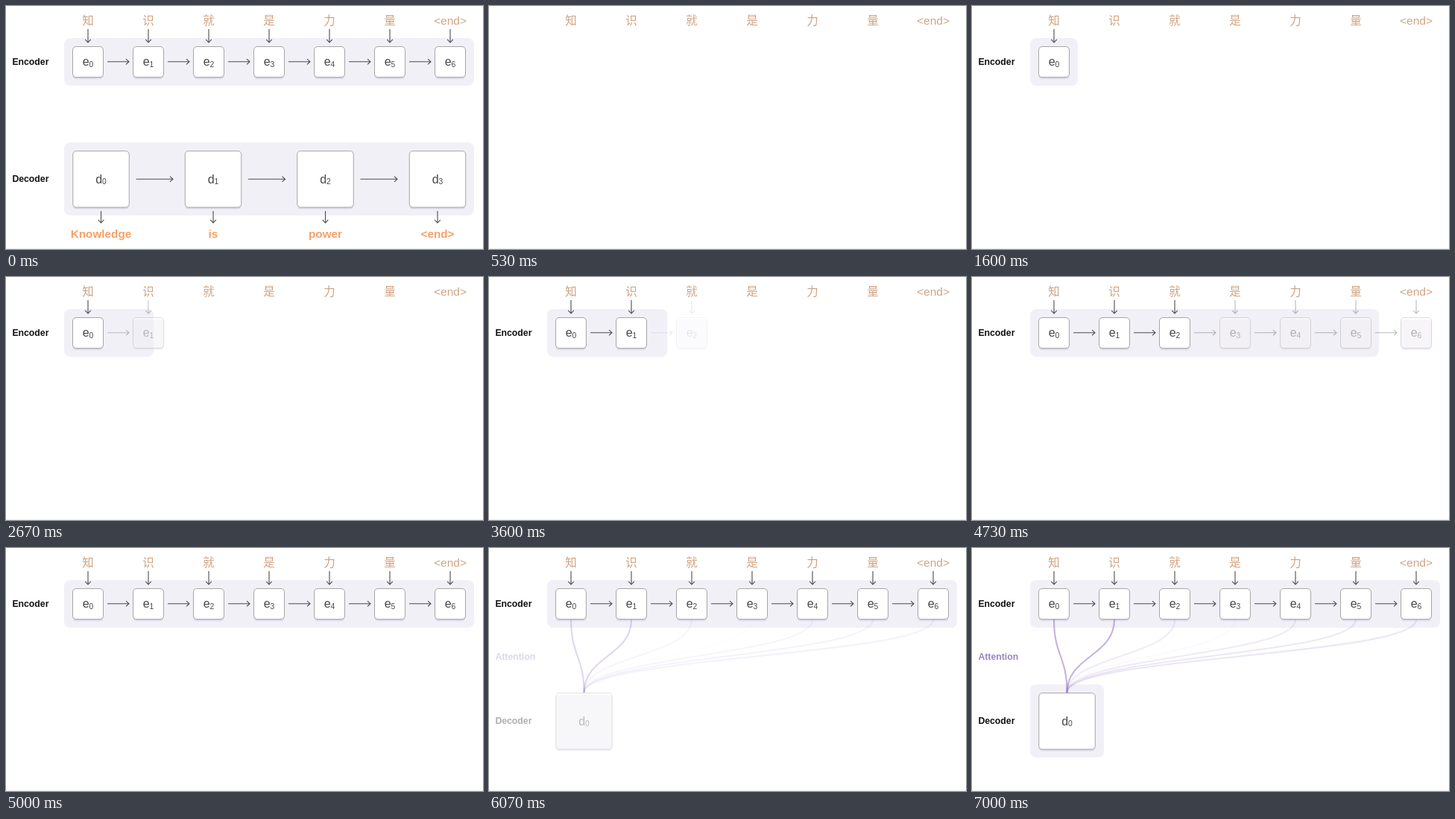
An HTML page that plays this animation: 640x326 px, repeating every 8 s.

```html
<!DOCTYPE html>
<html lang="en">
<head>
<meta charset="utf-8">
<title>Encoder and decoder</title>
<style>
  html, body { margin: 0; width: 100%; height: 100%; overflow: hidden; background: #fff; }
  svg { display: block; width: 100%; height: 100%; }
  text { font-family: "Liberation Sans", Arial, sans-serif; }
  .mid { text-anchor: middle; }
  .input { font: 15.5px "Liberation Sans", "Noto Sans CJK SC", "Noto Sans CJK", sans-serif; fill: #cfa382; }
  .state { font-size: 16px; fill: #484848; }
  .sub { font-size: 10.3px; }
  .label { font-size: 12.25px; font-weight: bold; fill: #111; }
  .label.attn { fill: #9a84c8; }
  .output { font-size: 15.3px; font-weight: bold; fill: #f7a066; }
  .arrow { fill: none; stroke: #4c4c4c; stroke-width: 1.1; }
  .panel { fill: #f2f0f7; }
  .shadow { fill: #dcd8e6; }
  .box { fill: #fff; stroke: #a6a6a6; }
  .link { fill: none; stroke: #8a68c0; stroke-width: 2.1; }
</style>
</head>
<body>
<svg id="stage" viewBox="0 0 640 326" preserveAspectRatio="none"></svg>
<script>
const LOOP = 8000, FPS = 15;
const stage = document.getElementById('stage');

function add(parent, tag, attrs, text) {
  const el = document.createElementNS('http://www.w3.org/2000/svg', tag);
  for (const k in attrs) el.setAttribute(k, attrs[k]);
  if (text) el.textContent = text;
  parent.appendChild(el);
  return el;
}

const group = () => add(stage, 'g', {});
const label = (y, s, extra = '') => add(stage, 'text', { class: 'label ' + extra, x: 8.4, y }, s);
const panel = (y, height) => add(stage, 'rect', { class: 'panel', x: 78, y, width: 550, height, rx: 8 });

function downArrow(g, x, y1, y2) {
  add(g, 'path', { class: 'arrow', d: `M${x} ${y1}V${y2}M${x - 3.8} ${y2 - 4.2}L${x} ${y2}L${x + 3.8} ${y2 - 4.2}` });
}

function rightArrow(g, x1, x2, y) {
  add(g, 'path', { class: 'arrow', d: `M${x1} ${y}H${x2}M${x2 - 4} ${y - 3.6}L${x2} ${y}L${x2 - 4} ${y + 3.6}` });
}

function box(g, cx, cy, size, letter, n) {
  const at = { x: cx - size / 2, width: size, height: size, rx: 4.5 };
  add(g, 'rect', { ...at, class: 'shadow', y: cy - size / 2 + 2.5 });
  add(g, 'rect', { ...at, class: 'box', y: cy - size / 2 });
  const t = add(g, 'text', { class: 'state mid', x: cx, y: cy + 5.3 }, letter);
  add(t, 'tspan', { class: 'sub', dy: 1.7 }, String(n));
}

// Parts fade one by one, so shadows show through half-faded boxes.
function fade(g, a) {
  g.style.display = a > 0 ? '' : 'none';
  for (const el of g.children) el.setAttribute('opacity', a);
}

const encX = i => 110 + 81 * i;
const decX = i => 127.5 + 150.5 * i;

add(stage, 'rect', { x: 0, y: 325, width: 640, height: 1, fill: '#eeeeee' });
const encPanel = panel(43, 64);
const decPanel = panel(183, 98);
const encLabel = label(79, 'Encoder');
const attnLabel = label(149.5, 'Attention', 'attn');
const decLabel = label(236.3, 'Decoder');

const inputs = [...'知识就是力量', '<end>'];
const enc = inputs.map((word, i) => {
  const x = encX(i), g = group();
  add(stage, 'text', { class: 'input mid', x, y: 25 }, word);
  downArrow(g, x, 31, 49);
  if (i) rightArrow(g, x - 55, x - 26, 74.7);
  box(g, x, 75, 41, 'e', i);
  return g;
});

const links = group();
const weights = [.5, .5, .13, .03, .14, .16, .17];
weights.forEach((w, i) => add(links, 'path', {
  class: 'link',
  'stroke-opacity': w,
  d: `M${encX(i)} 96C${encX(i)} 145 127.5 145 127.5 194`
}));

const dec = [];
const outputs = ['Knowledge', 'is', 'power', '<end>'].map((word, i) => {
  const x = decX(i), g = group(), out = group();
  box(g, x, 232.3, 75.5, 'd', i);
  dec.push(g);
  if (i) rightArrow(out, x - 103.5, x - 54, 232.3);
  downArrow(out, x, 275, 291);
  add(out, 'text', { class: 'output mid', x, y: 311 }, word);
  return out;
});

const ramp = (t, start, length) => Math.min(1, Math.max(0, (t - start) / length));

// cubic-bezier(.25, .1, .25, 1)
function ease(x) {
  let lo = 0, hi = 1, s = .5;
  for (let i = 0; i < 24; i++) {
    s = (lo + hi) / 2;
    const bx = .75 * s * (1 - s) + s * s * s;
    if (bx < x) lo = s; else hi = s;
  }
  return .3 * s * (1 - s) * (1 - s) + 3 * s * s * (1 - s) + s * s * s;
}

function draw(ms) {
  const t = Math.floor((ms + 4) * FPS / 1000) * 1000 / FPS;
  const all = t < 530;
  const steps = [
    ramp(t, 1060, 530),
    ramp(t, 2530, 335),
    ramp(t, 3525, 475),
    ramp(t, 4520, 475)
  ];

  enc.forEach((g, i) => fade(g, all ? 1 : Math.pow(steps[Math.min(i, 3)], 1.2)));
  const grown = ease(steps[1]) + ease(steps[2]) + 4 * ease(steps[3]);
  encPanel.setAttribute('width', all ? 550 : 64 + 81 * grown);
  encPanel.setAttribute('opacity', all ? 1 : steps[0]);
  encLabel.setAttribute('opacity', all ? 1 : steps[0]);

  const reveal = ramp(t, 5600, 1400);
  fade(links, all ? 0 : ramp(t, 5600, 860));
  attnLabel.setAttribute('opacity', all ? 0 : reveal);
  decLabel.setAttribute('opacity', all ? 1 : reveal);
  decPanel.setAttribute('width', all ? 550 : 99);
  decPanel.setAttribute('opacity', all ? 1 : ramp(t, 6070, 800));
  dec.forEach((g, i) => fade(g, all ? 1 : i ? 0 : reveal));
  outputs.forEach(g => fade(g, all ? 1 : 0));
}

const begin = performance.now();
function tick() {
  draw((performance.now() - begin) % LOOP);
  requestAnimationFrame(tick);
}
tick();
</script>
</body>
</html>
```
